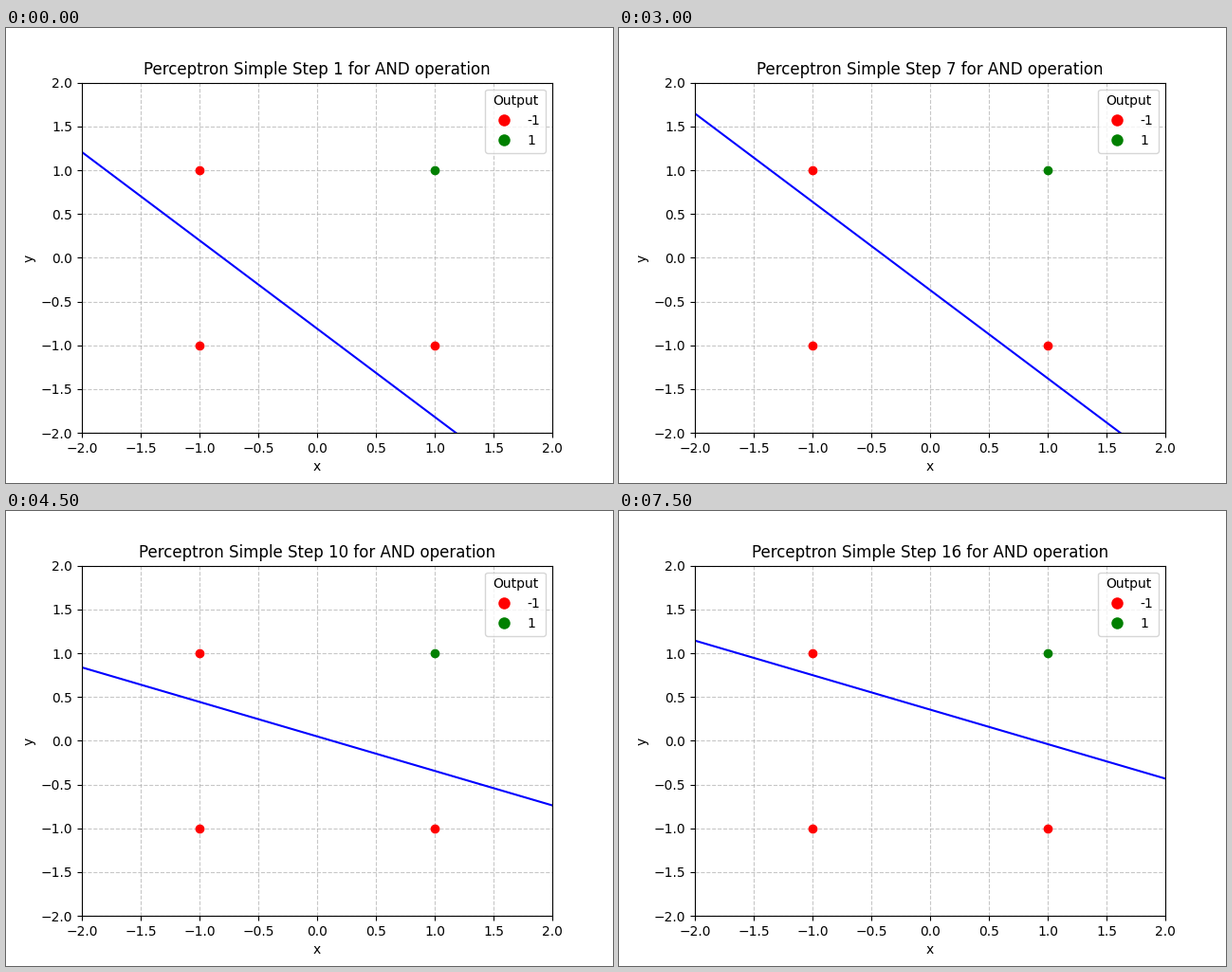
A matplotlib script that plays this animation: 640x480 px, repeating every 8 s.

```python
import numpy as np
import matplotlib.pyplot as plt
from matplotlib.animation import FuncAnimation
from matplotlib.lines import Line2D

STEPS = 16
RATE = 0.2203
START = np.array([1.008, 1.0, 0.809])  # weights for x, y and the bias

POINTS = [(-1, -1), (-1, 1), (1, -1), (1, 1)]
COLORS = {-1: "red", 1: "green"}

# Steps at which a misclassified point corrects the weights
FIXES = {3: (-1, 1), 5: (1, -1), 8: (1, -1), 9: (1, -1), 12: (1, -1), 16: (-1, 1)}


def target(x, y):
    return 1 if x > 0 and y > 0 else -1


def weights(step):
    w = START.copy()
    for at, (x, y) in FIXES.items():
        if at <= step:
            w += RATE * target(x, y) * np.array([x, y, 1])
    return w


fig, ax = plt.subplots(figsize=(6.4, 4.8), dpi=100)
ax.set(xlim=(-2, 2), ylim=(-2, 2), xlabel="x", ylabel="y")
ax.grid(True, linestyle="--", alpha=0.7)

for x, y in POINTS:
    ax.plot(x, y, "o", color=COLORS[target(x, y)])

handles = [
    Line2D([0], [0], marker="o", color="w", markerfacecolor=color,
           markersize=10, label=str(value))
    for value, color in COLORS.items()
]
ax.legend(handles=handles, title="Output", loc="upper right")

xs = np.array([-2.0, 2.0])
boundary, = ax.plot([], [], color="blue")
title = ax.set_title("")


def update(frame):
    step = frame + 1
    wx, wy, bias = weights(step)
    boundary.set_data(xs, -(wx * xs + bias) / wy)
    title.set_text(f"Perceptron Simple Step {step} for AND operation")
    return boundary, title


anim = FuncAnimation(fig, update, frames=STEPS, interval=500,
                     repeat=True, repeat_delay=0, blit=False)
plt.show()
```
